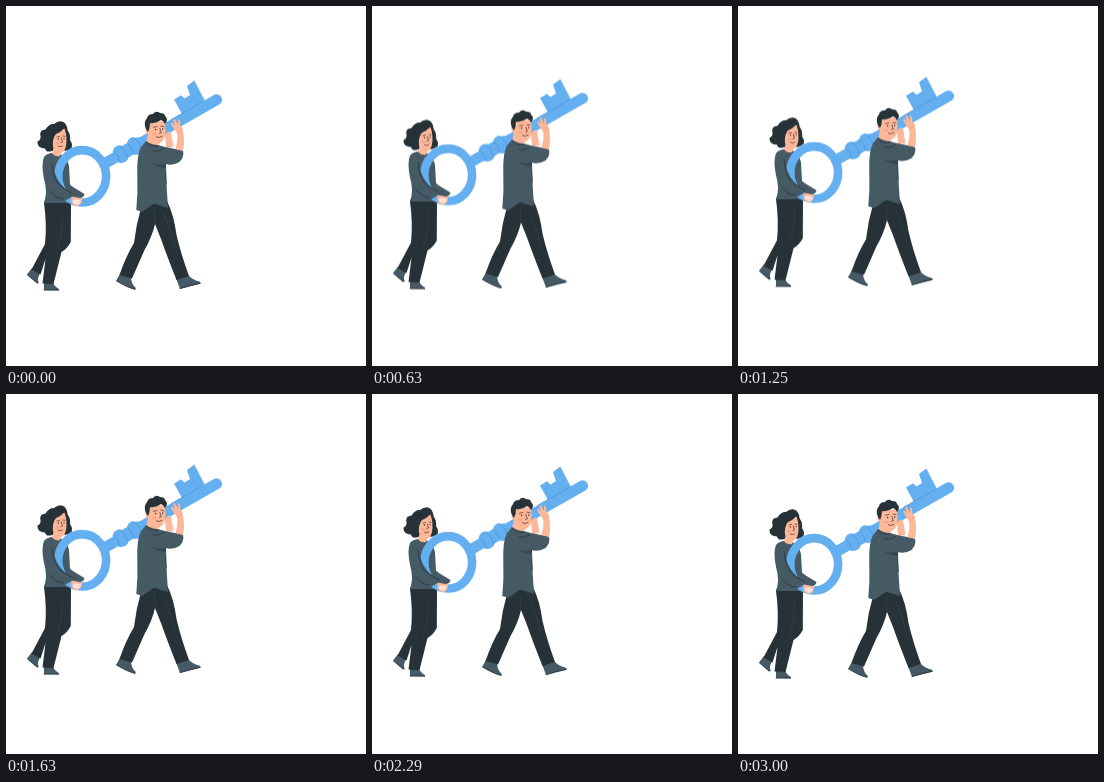
An HTML page that plays this animation: 360x360 px, repeating every 3.04 s.

```html
<!DOCTYPE html>
<html lang="en">
<head>
<meta charset="utf-8">
<title>Carrying the key</title>
<style>
html, body { margin: 0; width: 100%; height: 100%; overflow: hidden; background: #fff; }
svg { display: block; width: 100vw; height: 100vh; }
.scene { animation: bob 3040ms cubic-bezier(.37, 0, .63, 1) infinite; }
@keyframes bob {
  0%, 100% { transform: translateY(0); }
  50% { transform: translateY(-4px); }
}
.shirt { fill: #455a64; }
.fold { fill: #37474f; }
.pants, .hair { fill: #263238; }
.skin { fill: #fdb799; }
.blue { fill: #64aff0; }
.ring { fill: none; stroke: #64aff0; stroke-width: 8.6; }
.line { fill: none; stroke: #263238; stroke-width: .7; stroke-linecap: round; }
.crease { fill: none; stroke: #37474f; stroke-width: .6; stroke-linecap: round; }
.seam { fill: none; stroke: #4a93d6; stroke-width: .6; }
.face { fill: none; stroke: #40302d; stroke-width: .7; stroke-linecap: round; }
.eye { fill: #40302d; }
.blush { fill: #f58d7e; opacity: .5; }
</style>
</head>
<body>
<svg viewBox="0 0 360 360">
<g class="scene">
  <!-- woman -->
  <g>
    <path class="shirt" d="M26 262 L35 266 Q30 273 33 276.5 L31 277.5 Q26 273 21 268.5Z"/>
    <path class="shirt" d="M38 275 L46.5 275 Q48 280.5 53 283 L53 284.6 L38 284.3Z"/>
    <path class="line" d="M21.5 269 Q27 274 31.5 277 M38 284 H52.7"/>
    <path class="pants" d="M38.5 195 L65 195 L64.8 236 Q61 243 55.5 246 L47.5 278 L36.5 277.5 L39.5 253 L34.5 268.5 L25.5 263.5 L39 238 Q41 218 38 197Z"/>
    <path class="crease" d="M56 207 Q58 224 51 243"/>
    <path class="shirt" d="M45 147 L54 148 Q61 151 63 160 L65 197 L38 197 Q42 186 38 173 Q35 158 38 151 Q40 148 45 147Z"/>
    <path class="hair" d="M56 115.5 Q61 117 61.5 124 Q65 129 64 134 Q67 138 65.5 142 Q61 146 56 144 L46 145 Q40 147 39 142.5 Q31 142 31.5 135.5 Q35 134 34.5 130 Q33 124 39.5 123.5 Q43 117.5 48 118 Q52 114.5 56 115.5Z"/>
    <path class="skin" d="M47 124 Q53 126 58.5 122.5 Q61.5 131 60 140 Q58.5 146 55 147 L54 150 Q49 151 46 147 L47.5 142 Q44 136 47 124Z"/>
    <path class="hair" d="M46 122 Q54 121 59 120 Q57 125 50 128 Q46 132 47 143 L42 144 Q40 130 46 122Z"/>
    <path class="face" d="M51 131 L53.5 130.4 M57 130 L59 130.3 M55.3 132 L56.5 136 L55 136.4 M52.5 140.3 Q54.5 141.4 56.5 140"/>
    <circle class="eye" cx="52.4" cy="133" r=".7"/>
    <circle class="eye" cx="58.1" cy="132.6" r=".7"/>
    <ellipse class="blush" cx="51.3" cy="137.2" rx="1.7" ry="1.2"/>
  </g>

  <!-- key -->
  <g>
    <ellipse class="ring" cx="76.2" cy="170.3" rx="23.9" ry="26.2"/>
    <path class="blue" d="M168 93.5 L175 89.2 L178.5 92.5 L184 89 L181 80 L188.3 74.5 L199 95 L176 108Z"/>
    <g transform="translate(76.5 170) rotate(-29.7)">
      <path class="blue" d="M24 -5.2 H155.2 A5.5 5.5 0 0 1 155.2 5.6 H24Z"/>
      <path class="blue" d="M38 -6 Q42 -10.5 47 -8.5 Q49 -6 52 -6.5 H55 Q58 -10 63 -9 Q65 -6 68 -6 V6 Q65 6 63 9 Q58 10 55 6.5 H52 Q49 6 47 8.5 Q42 10.5 38 6Z"/>
      <path class="seam" d="M39 -5.5 Q42 0 39 5.5 M47.5 -7 Q51 0 47.5 7 M55 -6 Q58 0 55 6 M63.5 -8 Q67 0 63.5 8 M105 -5 H142"/>
    </g>
  </g>

  <!-- woman's near arm -->
  <g>
    <path class="skin" d="M66 190 L74 189 Q77 192 76 194 Q75.5 199.5 71 200 Q67 200 65 195Z"/>
    <path d="M67 194 Q72 192 75 195 Q74 199 70 198.6 Q66 198 67 194Z" fill="#ffe1d8"/>
    <path class="shirt" d="M41 157 Q46 155 48 164 Q51 176 60 183.5 Q58 178 57 173 L67 181 L78.5 188 Q78 191.5 74 192 L66 190.5 L57 196 Q45 192 42 180Z"/>
    <path class="line" d="M46 158 Q47 176 57 182 L67 188 M44 185 Q49 192 57 193"/>
  </g>

  <!-- man -->
  <g>
    <path class="shirt" d="M115 266 L125 270 Q125 278.5 130 282 L129 283.7 Q122 282 110 275Z"/>
    <path class="shirt" d="M170 272 L181.5 268.5 Q187 274.5 194 275.7 L194.5 277.7 Q185 280 174 283Z"/>
    <path class="line" d="M110.8 275 Q121 281.5 129 283.3 M174 282.6 Q185 279 194.5 277.2"/>
    <path class="pants" d="M135 195 L161 195 Q168 209 170.5 229 Q175 248 183 270 L170.5 274 Q161 250 155 233 L149 218 Q146 231 138.5 244 L126 272.5 L113.5 269 Q120 250 128 237 Q130 219 135 202Z"/>
    <path class="crease" d="M148 204 L149 217 M158 207 Q165 226 170 244"/>

    <path class="skin" d="M159 129 Q162 124 165 126 L167.5 141 L160 142Z"/>
    <path class="skin" d="M142 127 L155 130 L153 138 Q148 143 140 137Z"/>
    <path class="shirt" d="M140 135 Q146 139 152 139 L159 141 L177 144.5 Q178.5 151 173.5 156 Q167 160 159.5 158 Q160.5 180 162 202.5 L148 198 L137 206 L130.3 204 Q132 187 131.3 170 Q130.5 149 135 141Z"/>
    <path class="fold" d="M145 157 Q154 160 160 157.5 L159.5 162 Q151 161 145 157Z"/>
    <path class="line" d="M140 136 Q145 142 152 140 M158 142 Q154 146 147 145 M159.5 158 L160.3 178 M137 205.5 L148 198 L161.5 202"/>

    <path class="skin" d="M140 117 Q149 116 159 115 Q160.5 126 158.5 132 Q156 138 150 137 Q144 135 142 128 Q138 126 140 121Z"/>
    <path class="hair" d="M140 123 Q137 117 141 112 Q142 108 147 108 Q150 104 154 107 Q159 107 159 110 Q163 113 159 118 Q158 115 155 114 Q150 118 144 117 Q144 122 142 126Z"/>
    <path class="face" d="M147.5 121.3 L151 120.6 M155 120.2 L158 120.6 M153.8 122.5 L155.4 126.8 L153.6 127.2 M150.5 131 Q153.5 132.3 156 130.4"/>
    <circle class="eye" cx="149.6" cy="123.6" r=".75"/>
    <circle class="eye" cx="156.7" cy="123" r=".75"/>
    <ellipse class="blush" cx="148.4" cy="128" rx="2" ry="1.4"/>

    <path class="skin" d="M177 145 L169.5 143 Q172 135 171.5 128 L165.5 119 Q164.5 116 167 117 L169 120 L167.5 114 Q168 112 169.5 114 L172 119 L172 114 Q173 112 174 115 L174.5 120 Q177 121 177 125 Q179 135 177 145Z"/>
    <path d="M171 128 Q174 127 175 123" fill="none" stroke="#ee917f" stroke-width=".6"/>
  </g>
</g>
</svg>
</body>
</html>
```
